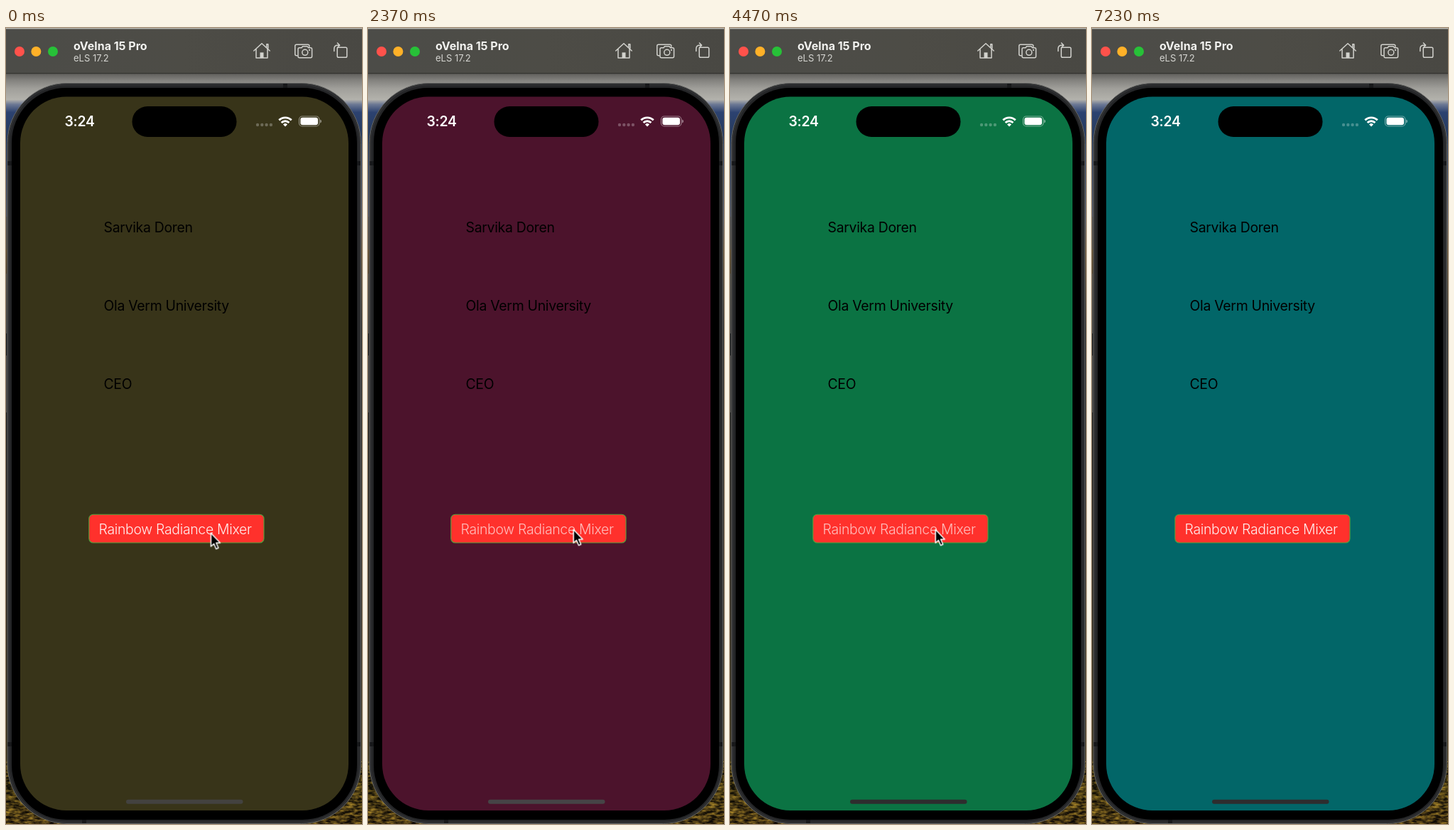
An HTML page for the animation above (7260 ms loop, 501 by 1118 pixels).

```html
<!DOCTYPE html>
<html lang="en">
<head>
<meta charset="utf-8">
<title>Colour mixer</title>
<style>
  html, body { margin: 0; width: 100%; height: 100%; overflow: hidden; background: #222; }
  svg { display: block; width: 100vw; height: 100vh; }
  text { font-family: Inter, "Liberation Sans", sans-serif; }
  .label { font-size: 19.4px; letter-spacing: -.29px; }

  .screen, .bar, .caption, .cursor { animation: 7260ms linear infinite; }
  .screen { animation-name: mix; animation-timing-function: step-end; }
  .bar { animation-name: bar; }
  .caption { animation-name: press; font-weight: 350; }
  .cursor { animation-name: pointer; animation-timing-function: ease-in-out; }

  @keyframes mix {
    0% { fill: #383419; }
    21.21% { fill: #4d2f33; }
    32.23% { fill: #4c132c; }
    42.29% { fill: #1e3110; }
    61.16% { fill: #0b7343; }
    71.63%, 100% { fill: #026668; }
  }
  @keyframes bar {
    0%, 18% { fill: #434240; }
    21.3% { fill: #413c3d; }
    26%, 52% { fill: #464446; }
    57%, 100% { fill: #2e2d2e; }
  }
  /* dims at once on touch, fades back on release */
  @keyframes press {
    0%, 19.5% { opacity: .92; }
    19.51%, 21.7% { opacity: .68; }
    27%, 30.5% { opacity: .92; }
    30.51%, 32.8% { opacity: .68; }
    38%, 40.6% { opacity: .92; }
    40.61%, 42.8% { opacity: .68; }
    48%, 59.5% { opacity: .92; }
    59.51%, 61.7% { opacity: .68; }
    67%, 69.9% { opacity: .92; }
    69.91%, 72% { opacity: .68; }
    77%, 100% { opacity: .92; }
  }
  @keyframes pointer {
    0%, 3% { transform: translate(288.4px, 709.4px); }
    8%, 89% { transform: translate(289.2px, 704.4px); }
    96%, 100% { transform: translate(430px, 1130px); }
  }
</style>
</head>
<body>
<svg viewBox="0 0 501 1118" preserveAspectRatio="none">
  <defs>
    <linearGradient id="wall" x1="0" y1="0" x2="0" y2="1">
      <stop offset=".057" stop-color="#5f5e5b"/>
      <stop offset=".066" stop-color="#84837f"/>
      <stop offset=".076" stop-color="#a09f9a"/>
      <stop offset=".09" stop-color="#b3b2ac"/>
      <stop offset=".096" stop-color="#6c7894"/>
      <stop offset=".106" stop-color="#2c4270"/>
      <stop offset=".14" stop-color="#25395a"/>
      <stop offset=".24" stop-color="#4d5260"/>
      <stop offset=".28" stop-color="#5d4a2c"/>
      <stop offset=".38" stop-color="#171a1c"/>
      <stop offset=".7" stop-color="#2a241b"/>
      <stop offset=".91" stop-color="#352c12"/>
      <stop offset=".955" stop-color="#4a4115"/>
      <stop offset=".972" stop-color="#4d3d15"/>
      <stop offset="1" stop-color="#402a13"/>
    </linearGradient>
    <linearGradient id="title" x1="0" y1="0" x2="1" y2="0">
      <stop offset="0" stop-color="#4c4c48"/>
      <stop offset=".5" stop-color="#4d4c46"/>
      <stop offset="1" stop-color="#494843"/>
    </linearGradient>
    <filter id="foliage" x="0" y="0" width="1" height="1" color-interpolation-filters="sRGB">
      <feTurbulence type="fractalNoise" baseFrequency=".1 .28" numOctaves="3" seed="4"/>
      <feColorMatrix values="1.5 0 0 0 -.46  1.2 0 0 0 -.37  .35 0 0 0 -.1  0 0 0 0 .75"/>
    </filter>
  </defs>

  <rect width="501" height="1118" fill="url(#wall)"/>
  <rect y="1030" width="501" height="88" filter="url(#foliage)"/>

  <!-- window bar -->
  <rect width="501" height="64" fill="url(#title)"/>
  <rect width="501" height="1" fill="#b9b9b4"/>
  <rect y="1" width="501" height="1" fill="#77766f"/>
  <rect y="63.3" width="501" height="1" fill="#2c2c29"/>
  <circle cx="19" cy="33" r="7" fill="#ff524b"/>
  <circle cx="42.4" cy="33" r="7" fill="#ffb128"/>
  <circle cx="66" cy="33" r="7" fill="#27c138"/>
  <text x="95" y="31" font-size="16" font-weight="700" letter-spacing="0" fill="#f2f2ef">oVelna 15 Pro</text>
  <text x="95" y="47" font-size="13" letter-spacing="0" fill="#d4d4d0">eLS 17.2</text>

  <g fill="none" stroke="#d2d2cd" stroke-width="1.5" stroke-linejoin="round" stroke-linecap="round">
    <path d="M348.8 32 360 21.8 371.2 32M352 29.8V42h16V29.8M366.8 27.2v-4.4h2v6"/>
    <path d="M357.5 42v-7.6h5V42Z" fill="#d2d2cd" stroke="none"/>
    <path d="M410 38.8h-1.2q-2 0-2-2V25.2q0-2 2-2h16q2 0 2 2v1"/>
    <path d="M413 27.7h3l1.6-2h6.4l1.6 2h3q2 0 2 2v10q0 2-2 2h-15.6q-2 0-2-2v-10q0-2 2-2Z"/>
    <circle cx="420.8" cy="34.3" r="4"/>
    <circle cx="427" cy="31" r=".4"/>
    <rect x="466.2" y="27.3" width="13.6" height="14" rx="1.8"/>
    <path d="M461.8 32.5v-3.2q0-5 5-5h2.4M466.4 21l3.2 3.3-3.2 3.2"/>
  </g>

  <!-- phone -->
  <rect x="2" y="77.5" width="497.5" height="1040" rx="84" fill="#242527" stroke="#686967" stroke-width="1"/>
  <rect x="4" y="79.5" width="493.5" height="1036" rx="82" fill="none" stroke="#2f3032" stroke-width="2"/>
  <path d="M390 78h6v6h-6ZM107 1111h6v6h-6ZM2.5 187h6v6h-6ZM493.5 187h5.5v6h-5.5ZM2.5 1003h6v6h-6ZM493.5 1003h5.5v6h-5.5Z" fill="#17181a"/>
  <path d="M.6 265v46M.6 345v84M.6 460v80" stroke="#4c4b49" stroke-width="1.2"/>
  <rect x="8" y="84" width="486" height="1028" rx="77" fill="#000"/>
  <rect class="screen" x="20" y="96.5" width="462" height="1002.5" rx="65"/>

  <!-- status bar -->
  <rect x="177.5" y="110" width="147" height="43" rx="21.5" fill="#000"/>
  <text x="82.5" y="138" font-size="19.4" font-weight="600" letter-spacing="-.3" fill="#fff">3:24</text>
  <g fill="#fff" fill-opacity=".27">
    <circle cx="354" cy="136" r="2.2"/>
    <circle cx="360.3" cy="136" r="2.2"/>
    <circle cx="366.6" cy="136" r="2.2"/>
    <circle cx="372.9" cy="136" r="2.2"/>
  </g>
  <g fill="none" stroke="#fff" stroke-width="2.9">
    <path d="M384.3 129.4a12.4 12.4 0 0 1 17.4 0M387.6 133a7.7 7.7 0 0 1 10.8 0"/>
    <path d="M393 138.5l-3-3a4.3 4.3 0 0 1 6 0Z" fill="#fff" stroke="none"/>
  </g>
  <rect x="412.5" y="124" width="28.4" height="14" rx="4.5" fill="none" stroke="#fff" stroke-opacity=".45" stroke-width="1.2"/>
  <rect x="414.4" y="125.8" width="24.6" height="10.4" rx="3" fill="#fff"/>
  <path d="M442.2 128.6q1.8.7 1.8 2.4t-1.8 2.4Z" fill="#fff" fill-opacity=".5"/>

  <!-- content -->
  <g class="label" fill="#000">
    <text x="137.5" y="287">Sarvika Doren</text>
    <text x="137.5" y="396.5">Ola Verm University</text>
    <text x="137.5" y="507">CEO</text>
  </g>
  <rect x="116.8" y="683.2" width="246.2" height="39.8" rx="6" fill="#ff312c" stroke="#52a03c" stroke-width="1.1"/>
  <text class="label caption" x="130.5" y="710.5" fill="#fff">Rainbow Radiance Mixer</text>
  <rect class="bar" x="169" y="1083.7" width="164.5" height="6" rx="3"/>

  <g class="cursor">
    <path d="M0 0V18.8L4.2 15 7.3 22.2 10.5 20.8 7.4 13.8H13Z" fill="#000" stroke="#fff" stroke-width="1.5" stroke-linejoin="round"/>
  </g>
</svg>
</body>
</html>
```
